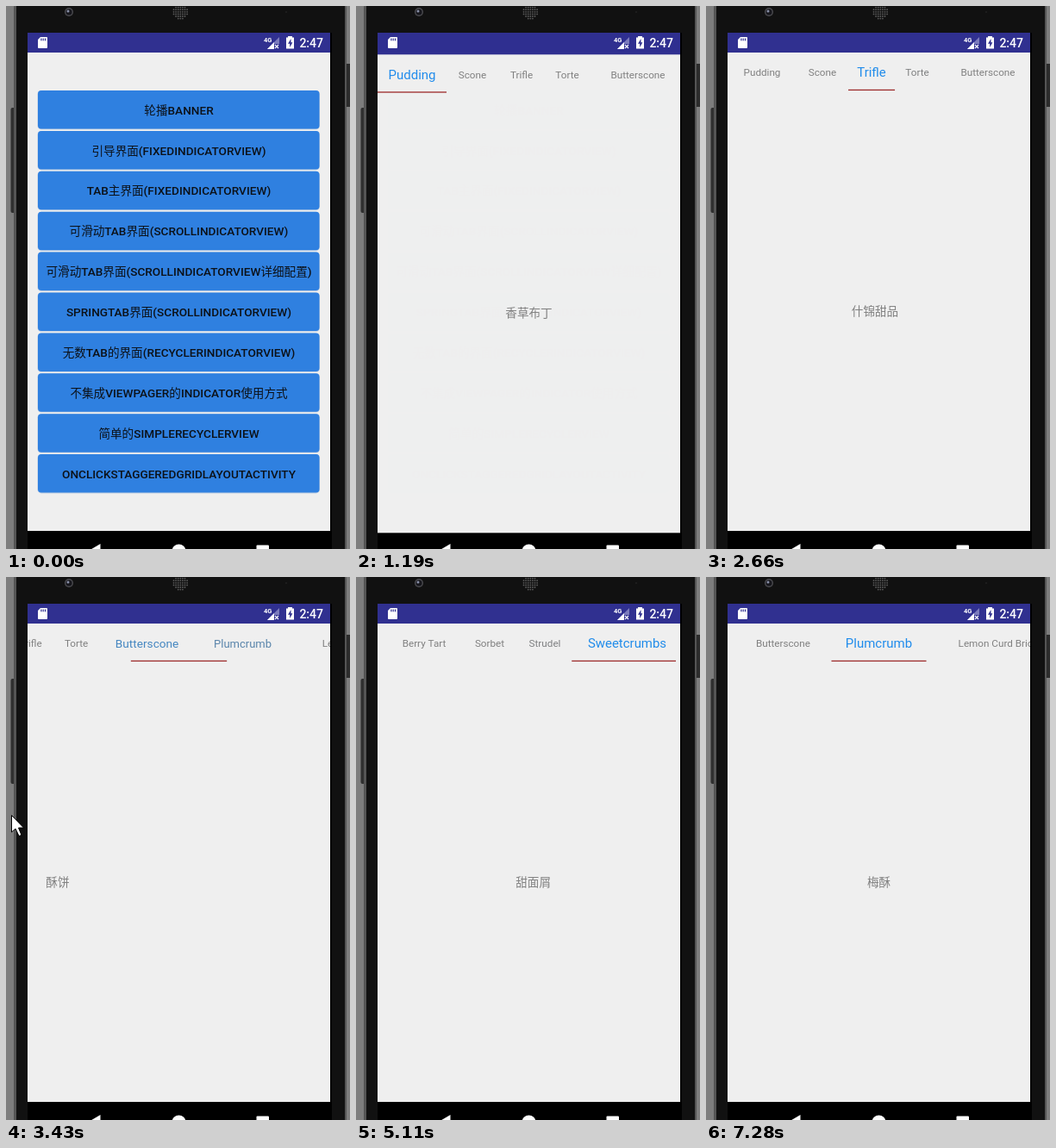
An HTML page with a canvas for the animation above (7.91 s loop, 399 by 630 pixels).

```html
<!DOCTYPE html>
<html lang="zh">
<head>
<meta charset="utf-8">
<style>
html, body { margin: 0; width: 100%; height: 100%; overflow: hidden; background: #7d7d7d; }
canvas { display: block; }
</style>
</head>
<body>
<canvas id="stage" width="399" height="630"></canvas>
<script>
const ctx = document.getElementById('stage').getContext('2d');
const LOOP = 7910, STEP = 70;
const LEFT = 25, WIDTH = 351, CENTER = 200.5;
const FONT = 'Roboto, "Noto Sans CJK SC", "Noto Sans CJK", sans-serif';

const buttons = [
  '轮播BANNER', '引导界面(FIXEDINDICATORVIEW)', 'TAB主界面(FIXEDINDICATORVIEW)',
  '可滑动TAB界面(SCROLLINDICATORVIEW)', '可滑动TAB界面(SCROLLINDICATORVIEW详细配置)',
  'SPRINGTAB界面(SCROLLINDICATORVIEW)', '无数TAB的界面(RECYCLERINDICATORVIEW)',
  '不集成VIEWPAGER的INDICATOR使用方式', '简单的SIMPLERECYCLERVIEW',
  'ONCLICKSTAGGEREDGRIDLAYOUTACTIVITY'
];

// label, page text, tab width
const tabs = [
  ['Pudding', '香草布丁', 80], ['Scone', '司康饼', 60], ['Trifle', '什锦甜品', 54],
  ['Torte', '果仁饼', 52], ['Butterscone', '酥饼', 112], ['Plumcrumb', '梅酥', 110],
  ['Lemon Curd Brioche', '柠檬酱小面包', 180], ['Berry Tart', '莓果挞', 92],
  ['Sorbet', '雪葩', 60], ['Strudel', '果馅卷', 68], ['Sweetcrumbs', '甜面屑', 123]
];
let total = 0;
const edges = [0, ...tabs.map(tab => total += tab[2])];

// start, duration, target page, pointer x and y near release
const swipes = [
  [1498, 400, 1, 59, 257], [2150, 380, 2, 20, 262], [2640, 300, 3, -10, 268],
  [2970, 300, 4], [3300, 300, 5, -14, 276], [3640, 300, 6],
  [4000, 256, 7, -16, 281], [4290, 260, 8], [4560, 260, 9, 24, 280],
  [4850, 280, 10], [5690, 590, 7], [6530, 260, 6], [6960, 310, 5]
];

const clamp = (v, lo = 0, hi = 1) => Math.min(hi, Math.max(lo, v));
const lerp = (a, b, k) => a + (b - a) * k;
const smooth = u => u * u * (3 - 2 * u);

function pageAt(t) {
  let page = 0;
  for (const [start, duration, target] of swipes)
    page = lerp(page, target, smooth(clamp((t - start) / duration)));
  return page;
}

function edgeAt(position) {
  const i = Math.floor(position);
  return lerp(edges[i], edges[i + 1] ?? total, position - i);
}

function rect(x, y, w, h, color) {
  ctx.fillStyle = color;
  ctx.fillRect(x, y, w, h);
}

function disc(x, y, r, color) {
  ctx.fillStyle = color;
  ctx.beginPath();
  ctx.arc(x, y, r, 0, 7);
  ctx.fill();
}

function shape(path, color, x = 0, y = 0) {
  ctx.save();
  ctx.translate(x, y);
  ctx.fillStyle = color;
  const outline = new Path2D(path);
  ctx.fill(outline);
  ctx.restore();
  return outline;
}

function rounded(x, y, w, h, r, color) {
  ctx.fillStyle = color;
  ctx.beginPath();
  ctx.roundRect(x, y, w, h, r);
  ctx.fill();
}

function text(str, x, y, size, color, weight = 400, align = 'center') {
  ctx.font = `${weight} ${size}px ${FONT}`;
  ctx.textAlign = align;
  ctx.fillStyle = color;
  ctx.fillText(str, x, y);
}

function drawPhone() {
  rect(0, 0, 399, 630, '#7d7d7d');
  rounded(5.5, 118, 6, 122, 2, '#303030');
  rounded(393, 67, 8, 50, 2, '#2c2c2c');
  rounded(9, -20, 386, 700, 24, '#555');
  rounded(12, -20, 381, 700, 22, '#111');
  disc(73, 7, 5, '#4c4c50');
  disc(73, 7, 3.6, '#16161c');
  disc(72, 6, 1.5, '#8990a8');
  disc(325, 7, 1, '#222');
  for (let x = -8; x <= 8; x += 2.6)
    for (let y = -8; y <= 8; y += 2.6)
      if (Math.hypot(x, y) < 9) disc(202.5 + x, 7 + y, .9, '#5a5a5a');
  rect(LEFT, 31, 353, 599, '#000');
}

function drawMenu() {
  rect(LEFT, 54, WIDTH, 555, '#efefef');
  buttons.forEach((label, i) => {
    const y = 98 + i * 46.9;
    rounded(36.5, y, 327.5, 45.3, 4.5, '#b9cbe2');
    rounded(37, y, 326.5, 44.5, 4, '#2f80e0');
    text(label, CENTER, y + 27.6, 13.6, '#0c1118', 500);
  });
}

function drawPager(t) {
  rect(LEFT, 31, WIDTH, 23, '#303090');
  rect(LEFT, 54, WIDTH, 555, '#efefef');
  rect(LEFT, 609, WIDTH, 60, '#000');
  const page = pageAt(t), bar = pageAt(t - 14);
  const from = edgeAt(bar);
  const to = edgeAt(Math.min(bar + 1, tabs.length));
  const scroll = clamp((from + to) / 2 - WIDTH / 2, 0, total - WIDTH);
  tabs.forEach(([label, content, width], i) => {
    const k = clamp(1 - Math.abs(i - page));
    const size = lerp(11.7, 15, k);
    const color = `rgb(${lerp(128, 32, k)},${lerp(128, 140, k)},${lerp(128, 236, k)})`;
    text(label, LEFT + edges[i] + width / 2 - scroll, 77 + size * .35, size, color);
    text(content, CENTER + (i - page) * WIDTH, 358.8, 13.6, '#808080');
  });
  rect(LEFT + from - scroll, 96.8, to - from, 1.3, '#9c2a2a');
}

function drawStatus() {
  shape('M40 36H47Q48 36 48 37V48Q48 49 47 49H38Q37 49 37 48V39Z', '#fff');
  for (const x of [40.3, 42.6, 44.9]) rect(x, 37.5, 1.2, 2.8, '#303090');
  text('4G', 299, 41.8, 7.5, '#fff', 700, 'left');
  shape('M317 36V50H303Z', '#7c7cbc');
  shape('M311 42V50H303Z', '#fff');
  rect(311, 44, 6, 6, '#303090');
  ctx.strokeStyle = '#fff';
  ctx.lineWidth = 1.2;
  ctx.stroke(new Path2D('M312 45L316 49M316 45L312 49'));
  shape('M327 35H332V36.5H334V49.5H325V36.5H327Z', '#fff');
  shape('M330.5 38L327 43.8H329.2V48L332.4 42.2H330.5Z', '#303090');
  text('2:47', 368, 47.7, 14, '#fff', 500, 'right');
}

function drawNavigation() {
  shape('M109.5 624V641L95 632.5Z', '#fff');
  disc(200.5, 632.5, 8, '#fff');
  rounded(290.5, 625.5, 14.5, 14.5, 1, '#fff');
}

function drawPointer(x, y) {
  ctx.save();
  ctx.translate(x + .5, y + .5);
  const outline = shape('M0 0V19.5L4.5 15.5L8.5 24L11.5 23L8 14.5H14Z', '#fff');
  ctx.strokeStyle = '#000';
  ctx.lineWidth = 1;
  ctx.stroke(outline);
  ctx.restore();
}

function draw(t) {
  drawPhone();
  ctx.save();
  ctx.beginPath();
  ctx.rect(LEFT, 31, WIDTH, 599);
  ctx.clip();
  rect(LEFT, 31, WIDTH, 23, '#303090');
  if (t < 1400) drawMenu();
  if (t >= 1050) {
    ctx.globalAlpha = 1 - (1 - clamp((t - 1036) / 200)) ** 4;
    ctx.translate(0, 50 * (1 - clamp((t - 1033) / 350)) ** 5);
    drawPager(t);
  }
  ctx.restore();
  drawStatus();
  drawNavigation();
  for (const [start, duration, , x, y] of swipes) {
    const u = (t - start) / duration;
    if (y && u > .4 && u < .85) drawPointer(x + (.6 - u) * 120, y);
  }
  if (t >= 5740 && t < 5950) drawPointer(60 - (t - 5740) * .45, 56);
}

function tick() {
  const t = performance.now() % LOOP;
  draw(Math.floor(t / STEP) * STEP);
  requestAnimationFrame(tick);
}
tick();
</script>
</body>
</html>
```
